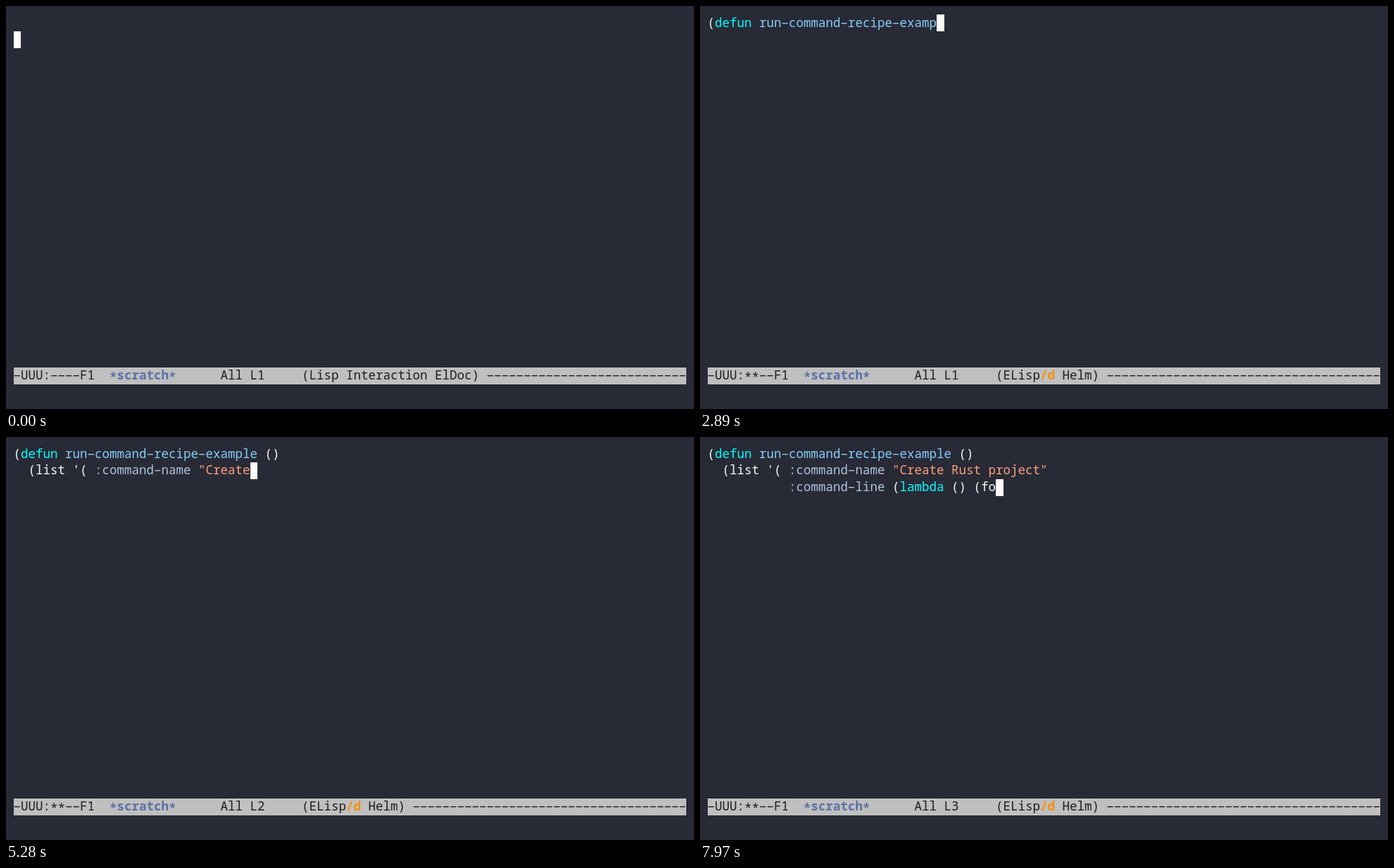
Write an HTML page with a canvas that moves like this. It is 977 by 573 pixels and loops after 8 s.

```html
<!DOCTYPE html>
<html lang="en">
<head>
<meta charset="utf-8">
<title>Typing a recipe in an editor</title>
<style>
  html, body { margin: 0; width: 100%; height: 100%; overflow: hidden; background: #282a36; }
  canvas { display: block; }
</style>
</head>
<body>
<canvas id="stage" width="977" height="573"></canvas>
<script>
const ctx = document.getElementById('stage').getContext('2d');
const LOOP = 8000, READY = 280, TYPING = 1430;
const LEFT = 10.5, TOP = 12, CELL_W = 10.5, CELL_H = 23.9, COLS = 91;
const MODE_ROW = 21, ECHO_ROW = 22, BASELINE = 17.5;
const FONT = '17.5px "Noto Sans Mono", "DejaVu Sans Mono", monospace';
const BG = '#282a36', FG = '#f8f8f2', BAR = '#bfbfbf', INK = '#1c1c1c';

const GREETING = 'For information about GNU Emacs and the GNU system, type C-h C-a.';
const INDENTS = [0, 2, 11];

// Bursts of typing: first key, last key, text
const BURSTS = [
  [TYPING, 2160, '(defun run-comman'],
  [2240, 3010, 'd-recipe-example '],
  [3050, 3150, '()\n'],
  [3760, 4010, '(list '],
  [4160, 4410, '\'( :c'],
  [4460, 4920, 'ommand-name'],
  [4970, 5700, ' "Create Rust proj'],
  [5780, 5940, 'ect"\n'],
  [6550, 6830, ':comman'],
  [6890, 7340, 'd-line (l'],
  [7400, 7970, 'ambda () (fo']
];

const RULES = [
  [/(?<=\()(defun|lambda)\b/g, '#00ffff'],
  [/(?<=defun )[\w-]+/g, '#87cefa'],
  [/:[\w-]+/g, '#b0c4de'],
  [/".*/g, '#ffa07a']
];

const cellX = col => LEFT + col * CELL_W;
const cellY = row => TOP + row * CELL_H;

// Keys are evenly spaced within a burst.
function typedLines(t) {
  let typed = '';
  for (const [first, last, text] of BURSTS) {
    if (t < first) break;
    const part = Math.min(1, (t - first) / (last - first));
    typed += text.slice(0, 1 + Math.floor(part * (text.length - 1) + 1e-6));
  }
  return typed.split('\n').map((line, i) => ' '.repeat(INDENTS[i]) + line);
}

function fillCells(row, col, count, color) {
  const x = Math.round(cellX(col)), y = Math.round(cellY(row));
  ctx.fillStyle = color;
  ctx.fillRect(x, y, Math.round(cellX(col + count)) - x, Math.round(cellY(row + 1)) - y);
}

function drawChar(ch, x, base) {
  if (ch === ' ') return;
  if (ch === '-') ctx.fillRect(x + 1.2, base - 6, 8, 1.4);
  else ctx.fillText(ch, x, ch === '*' ? base + 3 : base);
}

function drawText(text, row, col, color, bold = false) {
  ctx.font = (bold ? '700 ' : '400 ') + FONT;
  const base = Math.round(cellY(row) + BASELINE);
  [...text].forEach((ch, i) => {
    ctx.fillStyle = Array.isArray(color) ? color[i] : color;
    drawChar(ch, cellX(col + i), base);
  });
  return col + text.length;
}

function drawCode(text, row) {
  const colors = Array(text.length).fill(FG);
  for (const [pattern, color] of RULES) {
    for (const m of text.matchAll(pattern)) {
      colors.fill(color, m.index, m.index + m[0].length);
    }
  }
  drawText(text, row, 0, colors);
}

function drawModeLine(t, line) {
  fillCells(MODE_ROW, 0, COLS, BAR);
  const put = (text, col, color = INK, bold = false) => drawText(text, MODE_ROW, col, color, bold);
  put(t < TYPING ? '-UUU:----F1' : '-UUU:**--F1', 0);
  put('*scratch*', 13, '#5b6fa6', true);
  put('All L' + line, 28);
  let col;
  if (t < READY) {
    col = put('(Lisp Interaction ElDoc) ', 39);
  } else {
    col = put('(ELisp', 39);
    col = put('/d', col, '#ff8c00', true);
    col = put(' Helm) ', col);
  }
  put('-'.repeat(COLS - col), col);
}

function draw(t) {
  const lines = typedLines(t);
  const last = lines.length - 1;
  ctx.fillStyle = BG;
  ctx.fillRect(0, 0, 977, 573);
  lines.forEach(drawCode);
  fillCells(t < READY ? 1 : last, lines[last].length, 1, '#fbfbf7');
  drawModeLine(t, lines.length);
  if (t >= READY && t < TYPING) drawText(GREETING, ECHO_ROW, 0, FG);
}

const start = performance.now();
function tick() {
  draw((performance.now() - start) % LOOP);
  requestAnimationFrame(tick);
}
tick();
</script>
</body>
</html>
```
